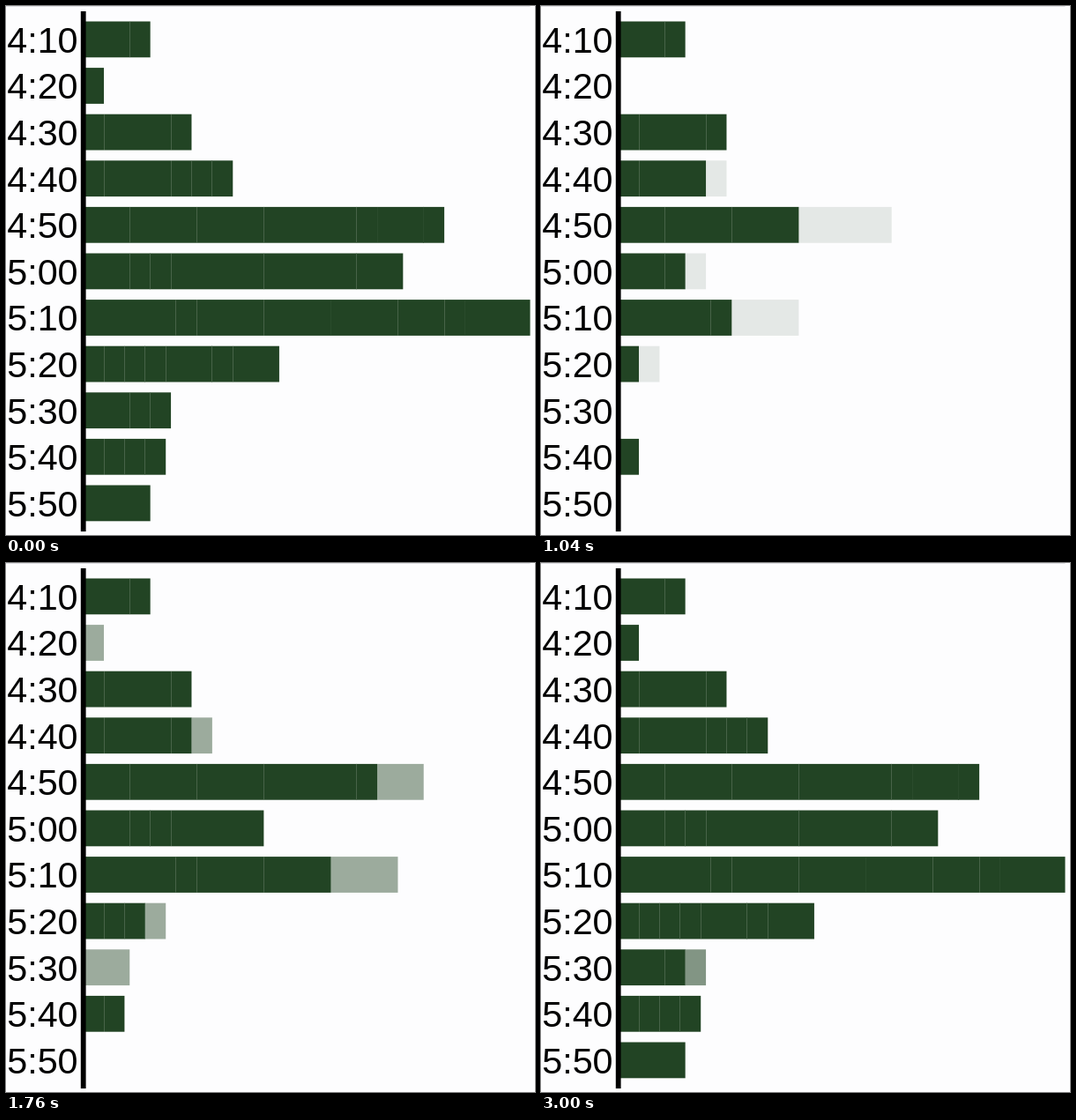
These frames come from a looping animation (600 by 600 pixels, 3.04 s). An HTML page:

```html
<!DOCTYPE html>
<html lang="en">
<head>
<meta charset="utf-8">
<title>Times histogram</title>
<style>
  html, body { margin: 0; width: 100%; height: 100%; overflow: hidden; background: #fdfdfe; }
  svg { display: block; width: 600px; height: 600px; }
  text { font: 41.3px "Liberation Sans", Arial, sans-serif; fill: #000; }
</style>
</head>
<body>
<svg id="chart" viewBox="0 0 600 600">
  <clipPath id="plot"><rect width="594.5" height="600"/></clipPath>
  <rect width="594.5" height="1" fill="#dedee2"/>
  <g id="bars" clip-path="url(#plot)"></g>
  <rect x="84.8" y="6" width="5.8" height="590"/>
  <g id="labels"></g>
</svg>
<script>
const LOOP = 3040, TICK = 40, FADE = 300, LEVELS = 9;
const GREEN = '#224424';

// Each bar is a stack of "batch:width" segments.
const rows = {
  '4:10': '1:9 3:4',
  '4:20': '6:4',
  '4:30': '1:4 2:13 3:4',
  '4:40': '1:4 3:13 4:4 6:4 9:4',
  '4:50': '1:9 2:13 3:13 4:18 5:4 6:9 7:4',
  '5:00': '2:9 3:4 4:4 5:18 7:18 9:9',
  '5:10': '1:18 2:4 4:13 5:13 6:13 7:9 8:4 9:13',
  '5:20': '3:4 4:4 5:4 6:4 7:9 8:4 9:9',
  '5:30': '6:9 8:4 10:4',
  '5:40': '2:4 5:4 8:4 9:4',
  '5:50': '8:13'
};
const starts = [100, 404, 710, 1005, 1315, 1610, 1903, 2200, 2525, 2828];
const faintSeams = [48, 57, 66, 74];

const bars = document.getElementById('bars');
const labels = document.getElementById('labels');

function add(parent, tag, attrs = {}) {
  const el = document.createElementNS('http://www.w3.org/2000/svg', tag);
  for (const key in attrs) el.setAttribute(key, attrs[key]);
  return parent.appendChild(el);
}

const toX = units => 87.62 + 5.85 * units;
const batches = starts.map(() => add(bars, 'g'));

Object.entries(rows).forEach(([label, segments], i) => {
  const y = 17.5 + 52.6 * i, height = 40.8;
  add(labels, 'text', { x: 1.2, y: y + 35.2 }).textContent = label;
  let units = 0;
  for (const segment of segments.split(' ')) {
    const [batch, size] = segment.split(':').map(Number);
    const group = batches[batch - 1];
    const x = Math.floor(toX(units));
    add(group, 'rect', { x, y, width: toX(units + size) - x, height, fill: GREEN });
    if (units) {
      const opacity = faintSeams.includes(units) ? 0.04 : 0.17;
      add(group, 'rect', { x, y, width: 1, height, fill: '#fff', opacity });
    }
    units += size;
  }
});

function opacityAt(t, start) {
  if (t < TICK) return 1;
  const p = Math.min(1, Math.max(0, (t - start) / FADE));
  return Math.floor(p * LEVELS) / LEVELS;
}

function draw() {
  const t = Math.floor(performance.now() % LOOP / TICK) * TICK;
  batches.forEach((group, i) => group.setAttribute('opacity', opacityAt(t, starts[i])));
  requestAnimationFrame(draw);
}
draw();
</script>
</body>
</html>
```
